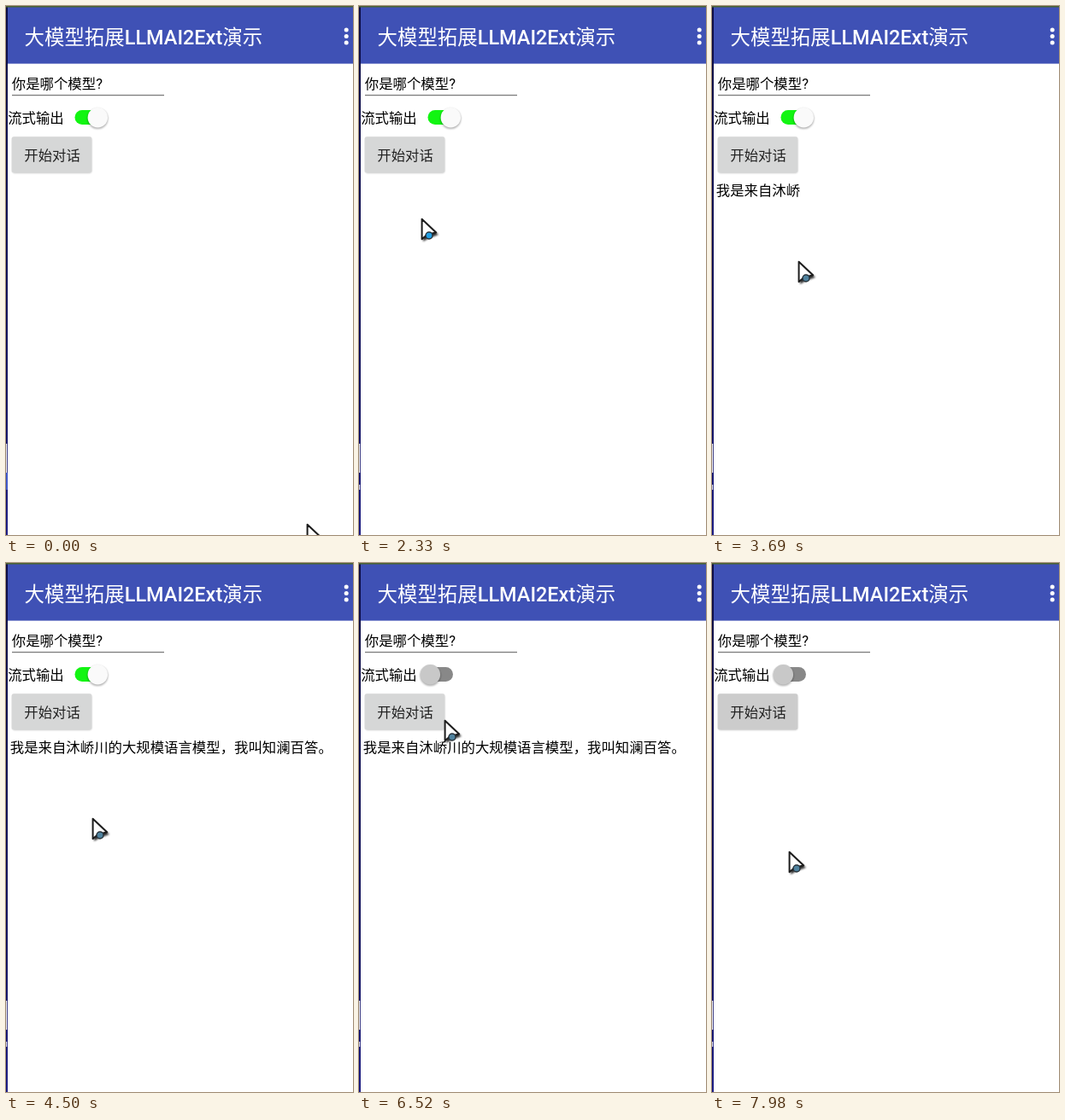
Animation, 406 px wide and 620 px high, one loop 8000 ms. Source, as an HTML page:

```html
<!DOCTYPE html>
<html lang="zh-CN">
<head>
<meta charset="utf-8">
<title>演示</title>
<style>
  html, body { margin: 0; width: 100%; height: 100%; overflow: hidden; background: #fff; }
  svg { display: block; width: 406px; height: 620px; }
  text { font: 16.4px Roboto, "Noto Sans CJK SC", "Noto Sans CJK", sans-serif; white-space: pre; }
  .title { font-size: 23.45px; fill: #fff; }
  .latin { font-weight: 500; }
</style>
</head>
<body>
<svg viewBox="0 0 406 620" xmlns="http://www.w3.org/2000/svg">
  <defs>
    <linearGradient id="edge" x2="0" y2="1">
      <stop stop-color="#0c0c44"/>
      <stop offset=".75" stop-color="#121260"/>
      <stop offset="1" stop-color="#1c1c84"/>
    </linearGradient>
    <filter id="soft" x="-50%" y="-50%" width="200%" height="200%">
      <feGaussianBlur stdDeviation="1.3"/>
    </filter>
  </defs>
  <rect width="406" height="620" fill="#fff"/>
  <rect width="2" height="620" fill="url(#edge)"/>
  <rect y="513" width="1.2" height="34" fill="#f0f0f0"/>
  <rect id="edgeBlue" y="547" width="2" height="20" fill="#4058c8"/>
  <rect id="edgeLight" y="561" width="1.2" height="6" fill="#d8d8ec"/>

  <rect x="2" y="1" width="404" height="66.6" fill="#3f51b5"/>
  <rect width="406" height="1.5" fill="#4c6430"/>
  <text class="title" x="21.5" y="44.5">大模型拓展<tspan class="latin">LLMAI2Ext</tspan>演示</text>
  <g fill="#fff">
    <circle cx="398.2" cy="28" r="2.5"/>
    <circle cx="398.2" cy="35.5" r="2.5"/>
    <circle cx="398.2" cy="43" r="2.5"/>
  </g>

  <text x="6.8" y="97">你是哪个模型?</text>
  <rect x="7" y="103.9" width="178" height="1.3" fill="#7c7c7c"/>

  <text x="2.2" y="136.5">流式输出</text>
  <rect id="track" x="80.5" y="122" width="29.5" height="17" rx="8.5"/>
  <g id="thumb">
    <circle cy="1.3" r="12" opacity=".32" filter="url(#soft)"/>
    <circle id="knob" r="11.7"/>
  </g>

  <rect x="7.5" y="154.5" width="92.5" height="41" rx="2" opacity=".3" filter="url(#soft)"/>
  <rect id="button" x="6.8" y="153.2" width="93.4" height="42" rx="2"/>
  <text x="21.3" y="181" fill="#212121">开始对话</text>
  <text id="reply" x="4.8" y="222.2"></text>

  <g id="cursor">
    <path d="M2 3V27L9 23L20 19Z" opacity=".8" filter="url(#soft)"/>
    <path d="M.6 .8V24.2L7 18.7L17.2 16.4Z" fill="#fff" stroke="#1c1c1c" stroke-width="2" stroke-linejoin="round"/>
    <circle id="dot" cx="9" cy="20" r="4" stroke="#26323a" stroke-width="1.4"/>
  </g>
</svg>
<script>
const LOOP = 8000;
const TICK = 135, LEAD = 8;   // the screen refreshes in even ticks
const GLIDE = 2;              // longest pointer move, in ticks

const el = id => document.getElementById(id);
const set = (id, name, value) => el(id).setAttribute(name, value);
const clamp = k => Math.min(1, Math.max(0, k));
const easeOut = k => 1 - (1 - k) ** 3;
const mix = (a, b, k) => a + (b - a) * k;
const grey = v => `rgb(${v},${v},${v})`;

// Places where the pointer comes to rest: [tick, x, y].
const rests = [
  [0, 352, 607], [3, 197, 322], [9, 149, 289], [10, 122, 254], [11, 69, 178],
  [13, 56, 165], [17, 73, 249], [19, 86, 297], [23, 101, 299], [42, 75, 180],
  [43, 93, 147], [45, 99, 126], [47, 100, 184], [52, 88, 285], [54, 54, 211],
  [56, 31, 166], [59, 90, 338]
];

function pointerAt(n) {
  const next = rests.findIndex(([tick]) => tick > n);
  if (next < 1) return rests.at(next).slice(1);
  const [t0, x0, y0] = rests[next - 1];
  const [t1, x1, y1] = rests[next];
  const begin = Math.max(t0, t1 - GLIDE);
  const k = easeOut(clamp((n - begin) / (t1 - begin)));
  return [mix(x0, x1, k), mix(y0, y1, k)];
}

// The reply streams in as chunks at a steady pace.
const chunks = '我是来自沐峤|川的大规模语言|模型，我叫|知澜百答|。'.split('|');
const CLEARED = 58;
const replyAt = n => n >= CLEARED ? ''
  : chunks.filter((_, i) => n >= Math.floor(27.3 + 1.6 * i)).join('');

function draw(t) {
  const n = Math.max(0, Math.floor((t - LEAD) / TICK));
  const on = 1 - clamp((n - 45) / 3);
  const off = 1 - on;
  const pressed = n === 21 || n === 22 || n >= CLEARED;
  const early = n < 16;

  set('cursor', 'transform', `translate(${pointerAt(n)})`);
  set('dot', 'fill', n < 23 ? '#229fe4' : '#4f829e');
  set('thumb', 'transform', `translate(${mix(83.4, 107.3, on)} 130.7)`);
  set('knob', 'fill', grey(mix(250, 200, off)));
  set('track', 'fill', `rgb(${mix(18, 136, off)},${mix(245, 136, off)},${mix(18, 136, off)})`);
  set('button', 'fill', pressed ? '#cccccc' : '#d6d7d7');
  set('edgeBlue', 'opacity', early ? 1 : 0);
  set('edgeLight', 'opacity', early ? 0 : 1);
  el('reply').textContent = replyAt(n);
}

const start = performance.now();
function tick() {
  draw((performance.now() - start) % LOOP);
  requestAnimationFrame(tick);
}
tick();
</script>
</body>
</html>
```
